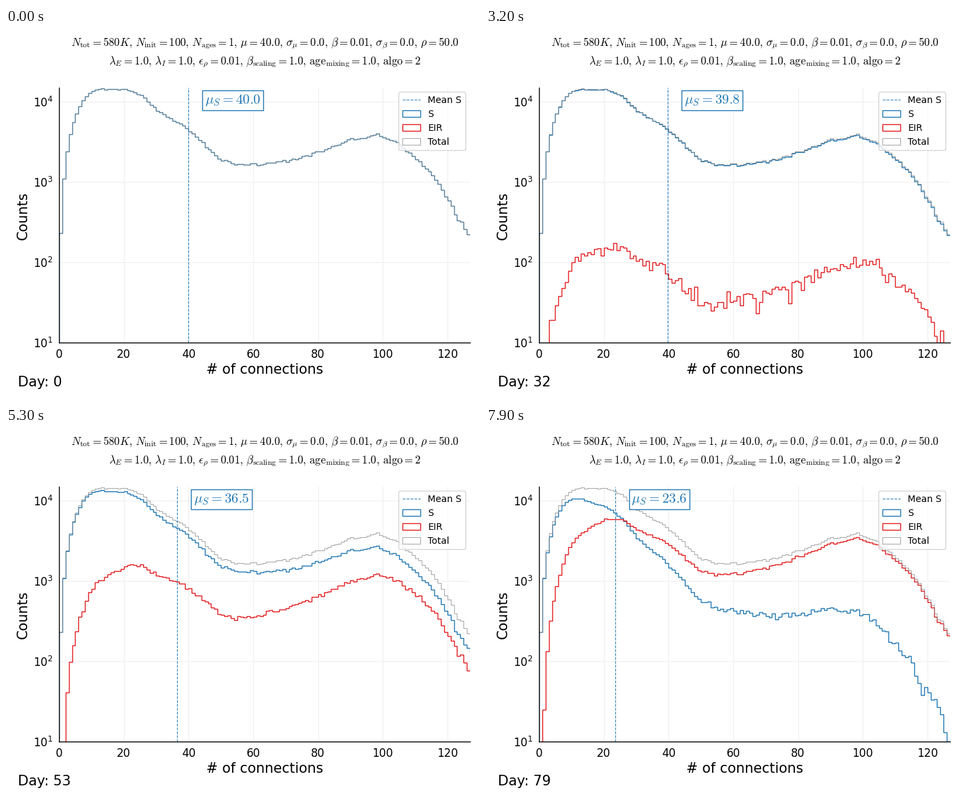
A matplotlib script that plays this animation: 715 px wide and 559 px high, repeating every 8 s.

```python
import numpy as np
import matplotlib.pyplot as plt
from matplotlib.animation import FuncAnimation
from matplotlib.patches import Patch

W, H, DPI = 715, 559, 100
LEFT, RIGHT, TOP, BOTTOM = 80, 700, 89.5, 474
DECADE = 121  # pixels per factor of ten
DAYS, BINS = 80, 128
BLUE, RED, GRAY = "#1f77b4", "#e41a1c", "gray"

rng = np.random.default_rng(4)
k = np.arange(BINS)


def logistic(x):
    return 1 / (1 + np.exp(-x))


def total_counts():
    """Steep rise to a plateau, a valley and a second hump, as log counts."""
    knots = [20, 25, 30, 39, 46, 50, 55, 70, 80, 90, 98, 104, 112, 116, 126]
    level = [4.155, 4.08, 3.89, 3.68, 3.4, 3.27, 3.21, 3.255, 3.37, 3.53,
             3.585, 3.5, 3.215, 3.04, 2.32]
    rise = np.sin(np.pi / 2 * np.minimum((k + 0.5) / 12.5, 1)) ** 1.54
    return rng.poisson(rise * 10 ** np.interp(k, knots, level))


def simulate(total):
    """Susceptible counts per day; more connections mean earlier infection."""
    risk = 0.0225 * (k + 0.3) + 0.14 * np.exp(-((k - 36) / 18) ** 2)
    left, prev, rows = total, 1, []
    for day in range(DAYS):
        strength = 1.2 * logistic(0.126 * (day - 66))
        alive = np.exp(-strength * risk ** min(1, 0.4 + 0.0082 * day))
        left = rng.binomial(left, np.clip(alive / prev, 0, 1))
        prev = alive
        rows.append(left)
    return rows


def mean_sus(day):
    return 40 - 18.08 * logistic(0.1444 * (day - 62.995))


total = total_counts()
sus = simulate(total)

plt.rcParams["font.family"] = "DejaVu Sans"
fig = plt.figure(figsize=(W / DPI, H / DPI), dpi=DPI, facecolor="white")
ax = fig.add_axes([LEFT / W, 1 - BOTTOM / H, (RIGHT - LEFT) / W, (BOTTOM - TOP) / H])
ax.set_yscale("log")
ax.set_xlim(0, 127)
ax.set_ylim(10, 10 ** (1 + (BOTTOM - TOP) / DECADE))
ax.set_xticks(range(0, 121, 20))
ax.minorticks_off()
ax.tick_params(length=0, pad=6.5, labelsize=12)
ax.set_axisbelow(True)
ax.grid(color="#f0f0f0", lw=0.9)
ax.spines[["top", "right"]].set_visible(False)
ax.spines[["left", "bottom"]].set_linewidth(1)


def put(x, y, s, size, **kw):
    """Text with its baseline at stage pixel (x, y)."""
    return fig.text(x / W, 1 - y / H, s, fontsize=size, va="baseline", **kw)


def put_params(y, *parts):
    put(390.5, y, "$" + r", \, ".join(parts) + "$", 12, ha="center",
        math_fontfamily="cm")


put_params(28, r"N_\mathrm{tot} = 580K", r"N_\mathrm{init} = 100",
           r"N_\mathrm{ages} = 1", r"\mu = 40.0", r"\sigma_\mu = 0.0",
           r"\beta = 0.01", r"\sigma_\beta = 0.0", r"\rho = 50.0")
put_params(55, r"\lambda_E = 1.0", r"\lambda_I = 1.0", r"\epsilon_\rho = 0.01",
           r"\beta_\mathrm{scaling} = 1.0", r"\mathrm{age}_\mathrm{mixing} = 1.0",
           r"\mathrm{algo} = 2")
put(390.3, 521, "# of connections", 15, ha="center")
put(32, 283, "Counts", 15, ha="center", rotation=90, rotation_mode="anchor")
day_text = put(18, 540, "", 15)


def steps(values, color, lw):
    return ax.stairs(values, np.arange(BINS + 1), baseline=0.5, color=color, lw=lw)


sus_line = steps(sus[0], BLUE, 1)
eir_line = steps(total - sus[0], RED, 1)
steps(total, GRAY, 0.5)
mean_line = ax.axvline(40, color=BLUE, lw=0.8, ls="--", alpha=0.9)
mean_text = ax.text(45, (BOTTOM - 114) / (BOTTOM - TOP), "", fontsize=15,
                    color=BLUE, va="baseline", math_fontfamily="cm",
                    transform=ax.get_xaxis_transform(),
                    bbox=dict(boxstyle="square,pad=0.17", fc="white", ec=BLUE, lw=1))


def key(color, lw):
    return Patch(fill=False, edgecolor=color, lw=lw)


ax.legend([mean_line, key(BLUE, 1), key(RED, 1), key(GRAY, 0.5)],
          ["Mean S", "S", "EIR", "Total"], loc="upper right", fontsize=10)


def draw(day):
    m = mean_sus(day)
    sus_line.set_data(np.maximum(sus[day], 0.5))
    eir_line.set_data(np.maximum(total - sus[day], 0.5))
    mean_line.set_xdata([m, m])
    mean_text.set_x(m + 5)
    mean_text.set_text(rf"$\mu_S = {m:.1f}$")
    day_text.set_text(f"Day: {day}")
    return sus_line, eir_line, mean_line, mean_text, day_text


anim = FuncAnimation(fig, draw, frames=DAYS, interval=100, repeat=True)
plt.show()
```
